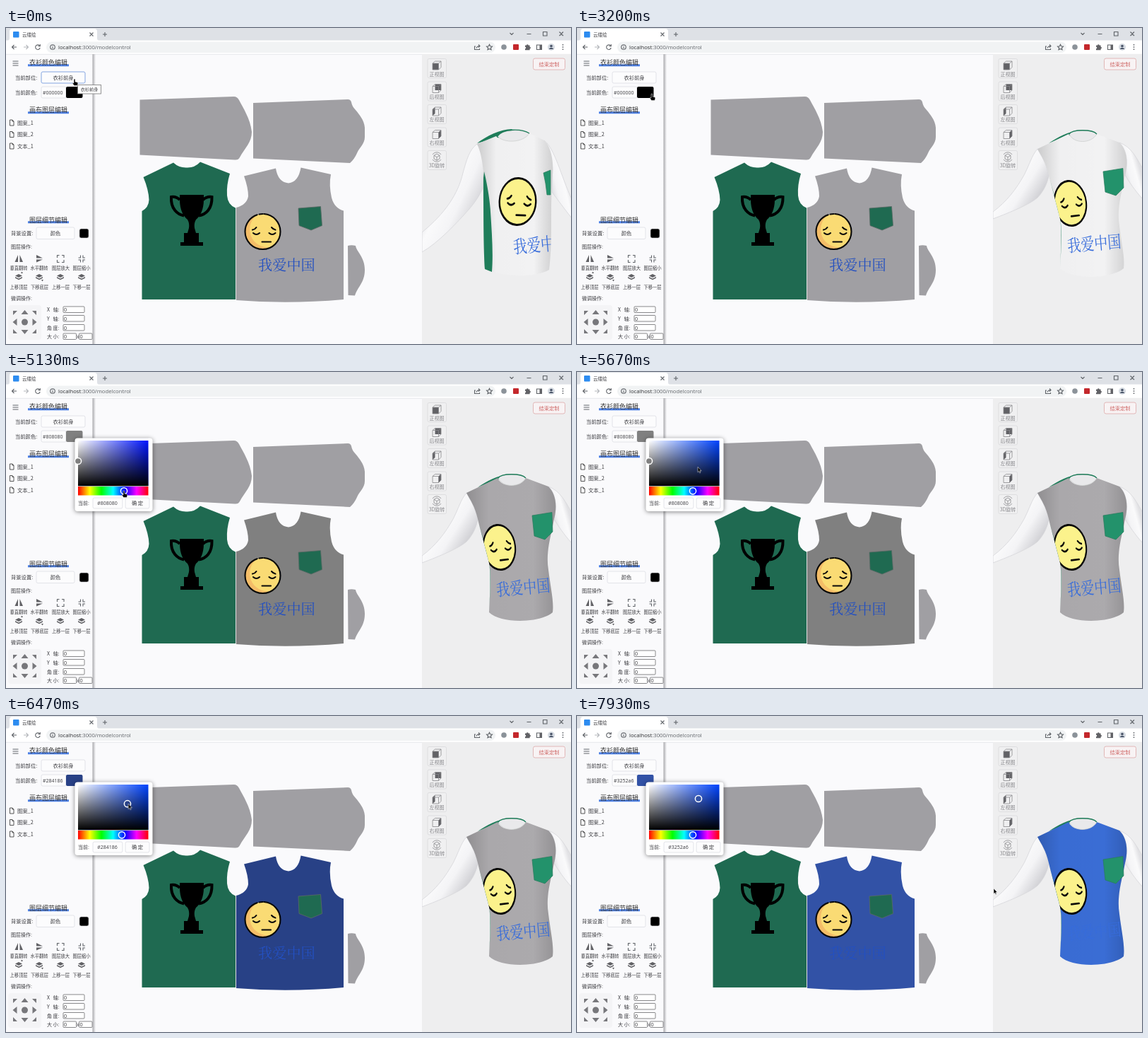
An HTML page for the animation above (8 s loop, 800x447 px).

```html
<!DOCTYPE html>
<html lang="zh-CN">
<head>
<meta charset="utf-8">
<title>Shirt designer</title>
<style>
html, body { margin: 0; width: 100%; height: 100%; overflow: hidden; background: #fafafc; }
svg { display: block; width: 800px; height: 447px; }
text { font-family: "Noto Sans CJK SC", "Noto Sans", sans-serif; font-size: 7.3px; fill: #3c3c40; }
.latin text, text.latin { font-family: "Open Sans", "Noto Sans", sans-serif; }
.head text { font-size: 9px; font-weight: 500; fill: #333; }
.head path { stroke: #4d80e4; stroke-width: 3; }
.tools text { font-size: 6.3px; text-anchor: middle; }
.views text { font-size: 7px; text-anchor: middle; fill: #88888c; }
.mid { text-anchor: middle; }
.song { font-family: "Noto Serif CJK SC", "Noto Sans CJK SC", serif; font-weight: 500; fill: #2450c0; }
.box { fill: #fcfcfd; stroke: #dcdee4; stroke-width: .8; }
.line { fill: none; stroke: #5f6368; stroke-width: 1.1; }
.field { fill: #fff; stroke: #6a6a6e; stroke-width: .8; }
.ink { fill: none; stroke: #080808; stroke-width: 2.1; stroke-linecap: round; }
.arm { stroke: #d6d6da; stroke-width: .8; }
.grey { fill: #a09fa3; }
.green { fill: #1f6a51; }
.dark { fill: #626266; }
.only { opacity: 0; }
#focus, #tip { animation: early 8s step-end infinite; }
#picker { animation: open 8s step-end infinite; }
#cursor { animation: travel 8s infinite linear; }
#hand { animation: hand 8s step-end infinite; }
#move { animation: move 8s step-end infinite; }
#arrow { animation: arrow 8s step-end infinite; }
@keyframes early { 0% { opacity: 1 } 14% { opacity: 0 } }
@keyframes open { 0% { visibility: hidden } 45% { visibility: visible } }
@keyframes travel {
  0%, 13.5% { transform: translate(97px, 73px); animation-timing-function: ease-in-out }
  21.2%, 22.2% { transform: translate(486px, 223px); animation-timing-function: ease-in-out }
  24.5% { transform: translate(705px, 255px); animation-timing-function: ease-in-out }
  32.5% { transform: translate(668px, 255px) }
  34% { transform: translate(660px, 250px); animation-timing-function: ease-in-out }
  39%, 45% { transform: translate(106px, 94px); animation-timing-function: ease-in-out }
  52%, 58% { transform: translate(103px, 126px); animation-timing-function: ease-in-out }
  60.6% { transform: translate(150px, 168px) }
  63.5%, 66% { transform: translate(167px, 169px); animation-timing-function: ease-in-out }
  71.2% { transform: translate(171px, 134px) }
  75%, 78.1% { transform: translate(174px, 129px) }
  85%, 89% { transform: translate(172px, 117px); animation-timing-function: ease-in-out }
  98%, 100% { transform: translate(590px, 244px) }
}
@keyframes hand { 0% { opacity: 1 } 15% { opacity: 0 } 38% { opacity: 1 } 46% { opacity: 0 } 60% { opacity: 1 } 67% { opacity: 0 } }
@keyframes move { 0% { opacity: 0 } 16% { opacity: 1 } 23% { opacity: 0 } 35% { opacity: 1 } 37.5% { opacity: 0 } 91% { opacity: 1 } 97.5% { opacity: 0 } }
@keyframes arrow { 0% { opacity: 0 } 15% { opacity: 1 } 16% { opacity: 0 } 23% { opacity: 1 } 35% { opacity: 0 } 37.5% { opacity: 1 } 38% { opacity: 0 } 46% { opacity: 1 } 60% { opacity: 0 } 67% { opacity: 1 } 91% { opacity: 0 } 97.5% { opacity: 1 } }
</style>
</head>
<body>
<svg viewBox="0 0 800 447">
<defs>
  <linearGradient id="edge"><stop offset="0" stop-color="#a8a8ac"/><stop offset="1" stop-color="#a8a8ac" stop-opacity="0"/></linearGradient>
  <linearGradient id="fold">
    <stop offset="0" stop-opacity=".18"/><stop offset=".25" stop-opacity=".03"/>
    <stop offset=".75" stop-opacity=".02"/><stop offset="1" stop-opacity=".16"/>
  </linearGradient>
  <linearGradient id="sleeve" x1=".25" y1=".35" x2=".75" y2=".75">
    <stop offset="0" stop-color="#e2e2e5"/><stop offset=".25" stop-color="#fafafb"/>
    <stop offset=".6" stop-color="#f4f4f6"/><stop offset="1" stop-color="#d3d3d7"/>
  </linearGradient>
  <linearGradient id="cuff" href="#sleeve" x1=".8" y1=".35" x2=".2" y2=".75"/>
  <linearGradient id="white"><stop offset="0" stop-color="#fff"/><stop offset="1" stop-color="#fff" stop-opacity="0"/></linearGradient>
  <linearGradient id="black" x2="0" y2="1"><stop offset="0" stop-opacity="0"/><stop offset="1"/></linearGradient>
  <linearGradient id="rainbow">
    <stop offset="0" stop-color="#f00"/><stop offset=".167" stop-color="#ff0"/><stop offset=".333" stop-color="#0f0"/>
    <stop offset=".5" stop-color="#0ff"/><stop offset=".667" stop-color="#00f"/><stop offset=".833" stop-color="#f0f"/><stop offset="1" stop-color="#f00"/>
  </linearGradient>
  <clipPath id="body"><path data-m="torso"/></clipPath>
  <clipPath id="stage"><rect x="589" y="37" width="211" height="410"/></clipPath>
  <g id="look">
    <path class="ink" d="M-13.500,2q4.500,4 9,0M9,2q4.500,4 9,0M-14.500,-2.500q3.500,-.5 5.500,-3.500M12.500,-6q2.500,3 5.500,3.500M-1,14.500h12.500"/>
  </g>
  <path id="cube" d="M-6,-3L-2.500,-6H6V2.500L2.500,6H-6ZM-6,-3H2.500V6M2.500,-3L6,-6" fill="none" stroke="#88888c" stroke-width=".8"/>
  <path id="page" d="M-2.500,-4H1L3,-2V4H-2.500ZM1,-4V-2H3" fill="none" stroke="#444" stroke-width=".9"/>
  <path id="layers" d="M0,-4L5,-1.500L0,1L-5,-1.500ZM-5,0L0,2.500L5,0V1.800L0,4.300L-5,1.800Z"/>
</defs>

<!-- browser -->
<rect width="800" height="18" fill="#dee1e6"/>
<path d="M2,18Q5,18 5,14V5Q5,1 9,1H125Q129,1 129,5V14Q129,18 132,18Z" fill="#fff"/>
<rect y="17.500" width="800" height="20" fill="#fff"/>
<rect x="10" y="5" width="8.500" height="8.500" rx="1" fill="#2d8cf0"/>
<text x="23" y="11.600" style="font-size:6.5px">云缕绘</text>
<g class="line">
  <path d="M118.500,6.500l5,5m0,-5l-5,5M140,6v6M137,9h6M713.500,7l2.500,2.500 2.500,-2.500M737.500,8.500h6M760.500,5.500h5.500v5.500h-5.500zM783.500,5.500l5.500,5.500m0,-5.500l-5.500,5.500"/>
  <path d="M15,27H8.500M11.500,24l-3,3 3,3"/>
  <path d="M25,27H31.500M28.500,24l3,3 -3,3" stroke="#b4b7bb"/>
  <path d="M47.500,25A3.300,3.300 0 1 0 48.200,28M48.300,23v2.700h-2.700"/>
</g>
<rect x="57" y="19.500" width="636" height="15.500" rx="7.700" fill="#f1f3f4"/>
<g class="line" stroke-width=".9">
  <circle cx="66" cy="27" r="3.300"/><path d="M66,26.500v2.500M66,24.800v.8"/>
  <path d="M665,26h-1.500v4.500h7v-1.500M666,28.500q1,-3 5,-3M669,23.500l2,2 -2,2"/>
  <path d="M684.500,23.200l1.200,2.600 2.800,.3 -2.100,1.900 .6,2.800 -2.500,-1.400 -2.500,1.400 .6,-2.800 -2.100,-1.900 2.800,-.3z"/>
</g>
<text class="latin" x="74" y="29.800" style="font-size:7.7px;fill:#2b2d30">localhost<tspan fill="#5f6368">:3000/modelcontrol</tspan></text>
<circle cx="705" cy="27" r="3.800" fill="#8b9299"/>
<rect x="718" y="23" width="8" height="8" rx="1" fill="#c4282c"/>
<path class="dark" d="M735,24.500h2a1.300,1.300 0 0 1 2.600,0h2v2.300a1.300,1.300 0 0 1 0,2.600v1.900h-6.600v-2.200a1.200,1.200 0 0 0 0,-2.400z" />
<path class="line" d="M751.500,24h7v6.500h-7z"/><rect x="755.500" y="24" width="3" height="6.500" class="dark"/>
<circle cx="772" cy="27" r="5" fill="#d6dbe2"/><circle cx="772" cy="25.500" r="1.800" fill="#4a5568"/><path d="M768.500,30q3.500,-4.500 7,0z" fill="#4a5568"/>
<path d="M788.500,23v1.600M788.500,26.200v1.600M788.500,29.400v1.600" stroke="#5f6368" stroke-width="1.600"/>

<!-- workspace -->
<rect y="37" width="800" height="410" fill="#fafafc"/>
<path d="M0,37.300H800" stroke="#dfe1e5" stroke-width=".7"/>
<rect x="122.500" y="37" width="4.500" height="410" fill="url(#edge)"/>
<rect x="589" y="37" width="211" height="410" fill="#eeeeef"/>

<!-- left panel -->
<path class="line" d="M9.500,47h8M9.500,50h8M9.500,53h8"/>
<g class="head">
  <path d="M31,52.800H89M31,119.800H89M31,274.800H89"/>
  <text x="33" y="52.300">衣衫颜色编辑</text><text x="33" y="119.300">画布图层编辑</text><text x="33" y="274.500">图层细节编辑</text>
</g>
<text x="13" y="72.800">当前部位:</text>
<rect class="box" x="50" y="62" width="62" height="16" rx="2"/>
<rect id="focus" x="50" y="62" width="62" height="16" rx="2" fill="none" stroke="#8fb0ea"/>
<text class="mid" x="81" y="72.800">衣衫前身</text>
<text x="13" y="93.800">当前颜色:</text>
<rect class="box" x="50" y="83" width="35" height="16" rx="2"/>
<text class="latin hex" x="52" y="93.700" style="font-size:7px">#000000</text>
<rect id="swatch" x="85" y="83" width="23.500" height="16" rx="2"/>
<use href="#page" x="8" y="134"/><use href="#page" x="8" y="150.500"/><use href="#page" x="8" y="167"/>
<text x="16" y="136.700">图案_1</text><text x="16" y="153.300">图案_2</text><text x="16" y="169.800">文本_1</text>
<text x="7" y="292.800" font-weight="500">背景设置:</text>
<rect class="box" x="43" y="282" width="54" height="16.500" rx="2"/><text class="mid" x="70" y="292.800">颜色</text>
<rect x="104" y="284" width="13" height="13" rx="2.500" stroke="#d0d0d4" stroke-width=".6"/>
<g font-weight="500"><text x="7" y="311.700" style="font-size:7px">图层操作:</text><text x="7" y="384.700" style="font-size:7px">微调操作:</text></g>
<g class="tools">
  <g class="dark">
    <path d="M17,321V331H12.500ZM19.500,321V331H24Z"/>
    <path d="M43,321L52,325.500H43ZM43,327.500H52L43,331.500Z"/>
    <use href="#layers" x="18" y="352"/><use href="#layers" x="47" y="352"/><use href="#layers" x="77" y="352"/><use href="#layers" x="107" y="352"/>
    <path d="M21,347l3,0 -1.500,-2.500zM50,356l3,0 -1.500,2.500z"/>
  </g>
  <path class="line" d="M72.500,325v-3.500h3M79,321.500h3v3.500M82,328v3.500h-3M75.500,331.500h-3v-3.500M102.500,325h3v-3.500M109,321.500v3.500h3M112,328h-3v3.500M105.500,331.500v-3.500h-3"/>
  <text x="18" y="342.400">垂直翻转</text><text x="47" y="342.400">水平翻转</text><text x="77.500" y="342.400">图层放大</text><text x="107" y="342.400">图层缩小</text>
  <text x="18" y="368.600">上移顶层</text><text x="47.500" y="368.600">下移底层</text><text x="77.500" y="368.600">上移一层</text><text x="107" y="368.600">下移一层</text>
</g>
<rect x="3" y="392" width="47" height="49" rx="4" fill="#f4f4f6"/>
<g fill="#77777b">
  <circle cx="26.500" cy="416" r="4.500"/>
  <path d="M21.500,405L26.500,399L31.500,405ZM21.500,427L26.500,433L31.500,427ZM15.500,411L9.500,416L15.500,421ZM37.500,411L43.500,416L37.500,421Z"/>
  <path d="M10,400h6l-6,6zM43,400v6l-6,-6zM10,432v-6l6,6zM43,432h-6l6,-6z"/>
</g>
<g class="field">
  <rect x="81" y="394" width="30" height="8.500" rx="1"/><rect x="81" y="406.500" width="30" height="8.500" rx="1"/>
  <rect x="81" y="419.500" width="30" height="8.500" rx="1"/><rect x="81" y="432" width="18.500" height="8.500" rx="1"/><rect x="103.500" y="432" width="18.500" height="8.500" rx="1"/>
</g>
<g font-weight="500">
  <text x="58" y="400.800" xml:space="preserve" style="font-size:7px">X   轴:</text><text x="58" y="413.500" xml:space="preserve" style="font-size:7px">Y   轴:</text>
  <text x="58" y="426.500" style="font-size:7px">角 度:</text><text x="58" y="439" style="font-size:7px">大 小:</text>
</g>
<g class="latin">
  <text x="82" y="400.800">0</text><text x="82" y="413.500">0</text><text x="82" y="426.500">0</text>
  <text x="82" y="439">0</text><text x="100" y="439" style="font-size:6.5px">x</text><text x="104.500" y="439">0</text>
</g>

<!-- pattern pieces -->
<g class="grey">
  <path d="M189.500,101.500L322,97Q327,96.500 330,102C335,112 346,128 348,147C348,162 338,170 331,183Q329,187 324,186.500L189.500,179.500Z"/>
  <path d="M350,106L484,101Q488,101 489,105Q490,111 495,116C500,122 507,130 508,141V154C508,164 501,168 497,177Q493,186 487,191L350,184.500Z"/>
  <path d="M484,308Q489,306.500 495,308C496,316 508,324 508,342C508,360 498,366 494,378.500L484.500,378Z"/>
</g>
<path class="green" d="M192.500,384V259Q202,254 202.500,243Q202,229 194.500,211L237,190.500Q245,198 256,197.500Q267,198 275,189.500L317,206Q312,222 313,237Q314,250 325,254.500V384Z"/>
<path id="front" d="M326,254Q341,250 343,238Q343,226 337,209.500L382,198.500Q385,218 400,219.500Q414,218 417.500,197.500L460,207Q457,222 461,240Q465,255 478,258.500V384Q400,391 326,385Z"/>
<path d="M325.500,255V384" stroke="#dadada" stroke-width=".8"/>
<g>
  <path d="M246,236H280V243C280,257 275,266 269,271Q266,276 267,283L269,290H273V303H279V308H247V303H252V290H257L259,283Q260,276 257,271C251,266 246,257 246,243Z"/>
  <path d="M246,243Q241,238 234,239C233,256 243,264 252,265.500M279,243Q284,238 291.500,239C292,256 283,264 273,265.500" fill="none" stroke="#000" stroke-width="4"/>
</g>
<path class="green" d="M414,255L445.500,252.500L447.500,279.500L432,286L415,279.500Z" stroke="#5c6a66" stroke-width=".8"/>
<g transform="translate(363.500 288)">
  <circle r="25" fill="#fadb74"/>
  <path d="M-8,-23.500A25,25 0 0 0 -8,23.500Q4,25 8,23C-22,20 -25,-12 -8,-23.500Z" fill="#f4bd68"/>
  <circle class="ink" r="25" style="stroke-dasharray:147 3 5 2;stroke-dashoffset:38"/>
  <use href="#look"/>
</g>
<text class="song" x="357" y="342.500" style="font-size:20.2px">我爱中国</text>

<!-- model view -->
<g clip-path="url(#stage)">
  <path data-m="back" fill="#1f7d5a"/>
  <path data-m="right" class="arm" fill="url(#cuff)"/>
  <path data-m="left" class="arm" fill="url(#sleeve)"/>
  <path data-m="torso" id="cloth"/>
  <path data-m="torso" fill="url(#fold)"/>
  <path data-m="side" fill="#1f7d5a"/>
  <path data-m="neck" fill="#e9e9eb" stroke="#c9ccca" stroke-width=".7"/>
  <path data-m="rim" fill="none" stroke="#1f7d5a" stroke-width="1.300"/>
  <path data-m="pocket" fill="#23926b" stroke="#2a7a5c" stroke-width=".7"/>
  <g clip-path="url(#body)">
    <g id="face"><circle r="25" fill="#fbf28c" stroke="#080808" stroke-width="2.300"/><use href="#look"/></g>
    <text id="words" class="song" style="font-size:19.5px;fill:#376cdb">我爱中国</text>
  </g>
</g>
<g class="views">
  <g class="box" style="fill:#f0f0f1;stroke:#d8d8db">
    <rect x="597" y="43.500" width="26.500" height="27" rx="2"/><rect x="597" y="76" width="26.500" height="27" rx="2"/><rect x="597" y="108.500" width="26.500" height="27" rx="2"/>
    <rect x="597" y="141" width="26.500" height="27" rx="2"/><rect x="597" y="173.500" width="26.500" height="27" rx="2"/>
  </g>
  <g class="dark">
    <path d="M604,50h8.500v9h-8.500zM607.500,79.500h8.500v8.500h-8.500zM604,115l3.500,-3v9l-3.500,3zM612.500,147.500l3.500,-3v8.500l-3.500,3.500z"/>
  </g>
  <use href="#cube" x="610" y="53"/><use href="#cube" x="610" y="85.500"/><use href="#cube" x="610" y="118"/><use href="#cube" x="610" y="150.500"/>
  <path d="M610,178l4,2.300v4.700l-4,2.300 -4,-2.300v-4.700zM606,180.300l4,2.300 4,-2.300M610,182.600v4.700M604,179a7,6.500 0 0 1 12,0M616,186a7,6.500 0 0 1 -12,0" fill="none" stroke="#88888c" stroke-width=".8"/>
  <text x="610" y="67.500">正视图</text><text x="610" y="100">后视图</text><text x="610" y="132">左视图</text><text x="610" y="164.500">右视图</text><text x="610" y="197">3D旋转</text>
</g>
<rect x="746.500" y="43" width="45" height="16" rx="2.500" fill="#f8f3f4" stroke="#dfb0b0" stroke-width=".9"/>
<text class="mid" x="769" y="53.700" style="fill:#cf6a69">结束定制</text>

<!-- colour picker -->
<g id="picker">
  <rect x="97.500" y="93.500" width="110" height="103.500" rx="4" fill="#fff" style="filter:drop-shadow(0 1px 3px #0007)"/>
  <rect id="tone" x="102" y="97" width="99.500" height="64"/>
  <rect x="102" y="97" width="99.500" height="64" fill="url(#white)"/>
  <rect x="102" y="97" width="99.500" height="64.300" fill="url(#black)"/>
  <rect x="102" y="162" width="99.500" height="12.500" fill="url(#rainbow)"/>
  <circle id="dot" r="4.600" stroke="#fff" stroke-width="1.500"/>
  <circle id="knob" cy="168.300" r="4.600" fill="none" stroke="#fff" stroke-width="1.500"/>
  <text x="102" y="187.800" style="font-size:7px">当前:</text>
  <rect class="box" x="123" y="178" width="42" height="15" rx="2"/><text class="latin hex mid" x="143.500" y="188" style="font-size:7px">#000000</text>
  <rect class="box" x="169" y="178" width="34" height="15" rx="2"/><text class="mid" x="186" y="188">确 定</text>
</g>

<g id="tip">
  <rect x="101.500" y="80.500" width="33" height="12.500" fill="#fff" stroke="#777" stroke-width=".8"/>
  <text class="mid" x="118" y="89" style="font-size:6.2px">衣衫前身</text>
</g>
<g id="cursor">
  <path id="hand" d="M-1,-.5Q0,-1.500 1,-.5V3L4,3.800Q5,4.300 4.800,6L4,8.500H-.5L-3,5Q-2.500,3.800 -1,5Z" stroke="#fff" stroke-width=".5"/>
  <path id="move" class="only" d="M0,-4L1.500,-2.300H.4V-.4H2.300V-1.500L4,0L2.300,1.500V.4H.4V2.300H1.500L0,4L-1.500,2.300H-.4V.4H-2.300V1.500L-4,0L-2.300,-1.500V-.4H-.4V-2.300H-1.500Z"/>
  <path id="arrow" class="only" d="M0,0V7.500L1.700,6L2.800,8.500L4,8L2.900,5.500H5.200Z" stroke="#fff" stroke-width=".5"/>
</g>
</svg>
<script>
const LOOP = 8000;
const $ = id => document.getElementById(id);

// Each part of the model: turned pose, then facing pose.
const poses = {
  torso: ["M694,153C702,164 732,164 741,149L762,159C771,166 776,188 774,208C772,235 772,255 772,280C772,305 771,325 769,342C750,353 705,353 678,341C676,315 676,270 676,250C676,235 674,220 676,203C674,185 672,175 667,164Z",
          "M696,150C702,164 728,164 736,150L768,162C778,172 781,188 776,208C771,235 764,255 768,280C771,305 776,325 774,340C755,356 700,356 684,340C685,315 688,290 684,270C678,245 672,225 668,208C664,190 658,182 652,171Z"],
  left: ["M667,164C656,172 652,187 647,205C640,235 622,262 589,289L589,317C612,304 640,274 656,256C668,242 676,228 680,212C680,190 676,175 667,164Z",
         "M652,171C644,180 640,195 633,208C622,228 608,246 589,260L589,270C615,260 640,250 652,240C660,232 666,220 668,209C664,190 658,182 652,171Z"],
  right: ["M762,159C777,170 786,210 801,242L801,269C790,255 782,244 773,232C774,200 772,175 762,159Z",
          "M768,162C785,168 793,185 801,199L801,242C790,230 782,218 776,208C781,188 778,172 768,162Z"],
  side: ["M677,203C680,215 685,240 686,260C688,290 690,320 688,345L678,341C676,310 676,250 676,212Z",
         "M668,208C672,224 680,250 684,270C687,290 685,315 684,340L684,340C685,315 688,290 684,270Z"],
  back: ["M667,163C680,153 700,143 716,143L722,149L694,156Z", "M668,163C680,155 695,146 716,144L736,150L696,152Z"],
  neck: ["M696,153C703,143 730,143 741,149C732,163 704,163 696,153Z", "M697,150C701,143 730,143 736,150C728,164 703,164 697,150Z"],
  rim: ["M696,153C703,142 730,142 741,149", "M697,150C701,143 730,143 736,150"],
  pocket: ["M761,205L771,201L771,236L766,236L764,220Z", "M745,203L773,198.500L774,226L763,237L748,232Z"],
};
// Share of the turn, then shift x, y, angle and scale x, y.
const faceKeys = [[0, 724.5, 245.5, 3, 1.03, 1.32], [1, 698.5, 248, -7, .9, 1.27]];
const wordKeys = [[0, 719, 319, -5, 1, 1.32], [1, 695, 317, -5, .98, 1.25]];

// Rows are time followed by values; equal times make a hard step.
const colour = [[0, 0, 0, 0], [4600, 0, 0, 0], [4600, 128, 128, 128], [5700, 128, 128, 128], [5700, 31, 47, 92],
  [6000, 34, 55, 112], [6250, 34, 55, 112], [6800, 49, 81, 166], [7050, 49, 81, 166], [7050, 50, 82, 166]];
const spot = [[0, 102, 161], [4600, 102, 161], [4600, 102, 126], [5700, 102, 126], [5700, 168, 134],
  [6000, 172, 129], [6250, 172, 129], [6800, 172, 117]];
const hue = [[0, 102], [4850, 102], [4850, 150], [5080, 167], [5180, 167], [5300, 164]];
const cloth = [[0, "#f7f7f8"], [4700, "#afadb0"], [6650, "#2d5fcc"], [7050, "#3b6fd9"]];

function track(keys, t) {
  const i = keys.findIndex(k => k[0] > t);
  if (i < 0) return keys[keys.length - 1].slice(1);
  const a = keys[i - 1], b = keys[i], k = (t - a[0]) / (b[0] - a[0]);
  return a.slice(1).map((v, n) => v + (b[n + 1] - v) * k);
}

function blend([a, b], k) {
  const to = b.match(/-?[\d.]+/g);
  let n = 0;
  return a.replace(/-?[\d.]+/g, v => (+v + (to[n++] - v) * k).toFixed(2));
}

function place(el, [x, y, turn, sx, sy]) {
  el.setAttribute("transform", `translate(${x} ${y}) rotate(${turn}) scale(${sx} ${sy})`);
}

const parts = [...document.querySelectorAll("[data-m]")];
const labels = [...document.querySelectorAll(".hex")];

function draw(now) {
  const t = now % LOOP;
  const u = Math.min(1, Math.max(0, (t - 1980) / 620));
  const k = u * u * (3 - 2 * u);
  for (const p of parts) p.setAttribute("d", blend(poses[p.dataset.m], k));
  place($("face"), track(faceKeys, k));
  place($("words"), track(wordKeys, k));

  const hex = "#" + track(colour, t).map(v => Math.round(v).toString(16).padStart(2, "0")).join("");
  const picked = t >= 4600;
  for (const l of labels) l.textContent = hex;
  $("swatch").style.fill = $("dot").style.fill = hex;
  $("front").style.fill = picked ? hex : "#a09fa3";
  $("cloth").style.fill = cloth.filter(c => c[0] <= t).pop()[1];

  const [x, y] = track(spot, t), [h] = track(hue, t);
  $("dot").setAttribute("cx", x);
  $("dot").setAttribute("cy", y);
  $("knob").setAttribute("cx", h);
  $("tone").style.fill = `hsl(${(h - 102) / 99.5 * 360} 100% 50%)`;
  requestAnimationFrame(draw);
}
draw(performance.now());
</script>
</body>
</html>
```
